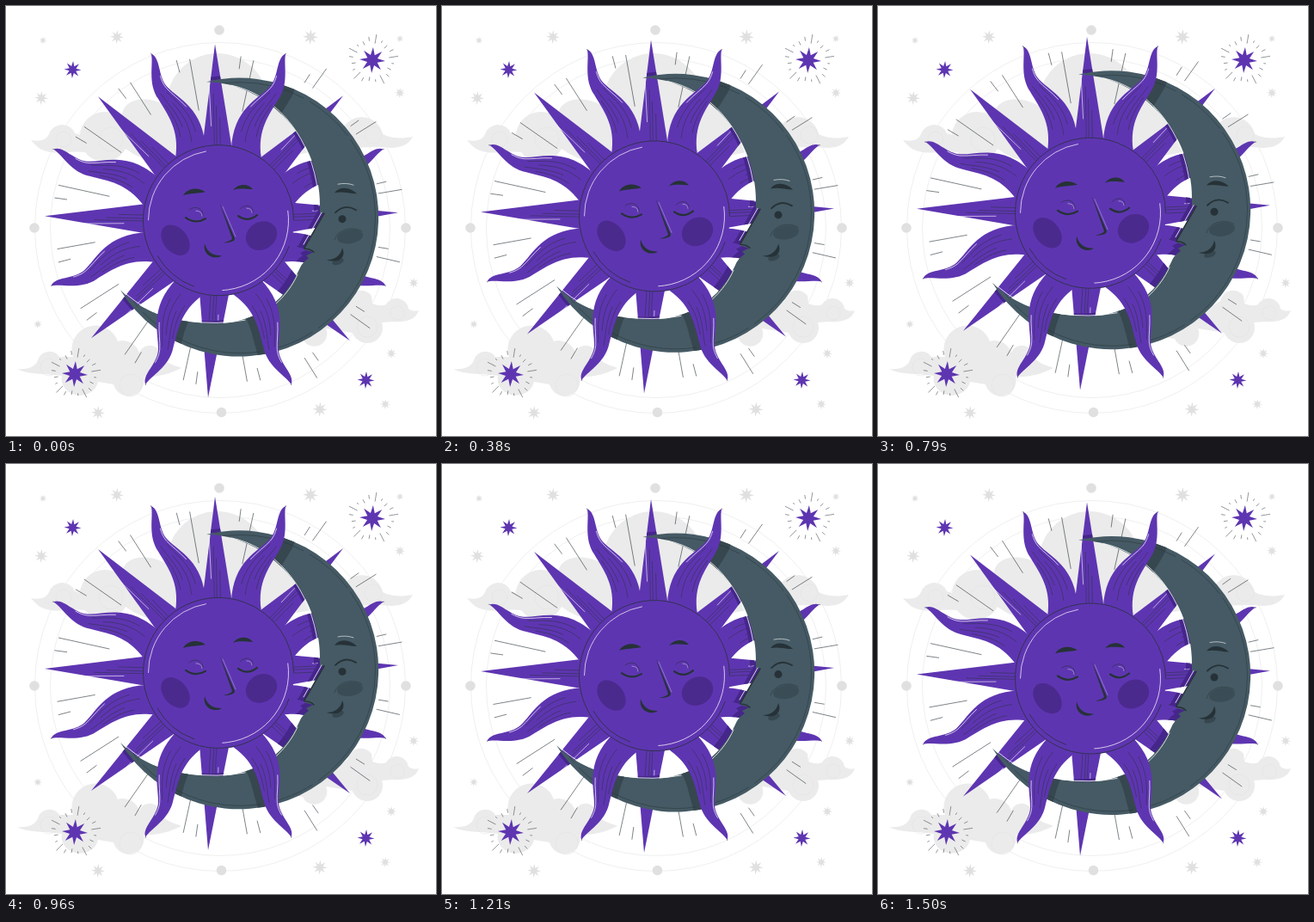
An HTML page that plays this animation: 500x500 px, repeating every 1.54 s.

```html
<!DOCTYPE html>
<html lang="en">
<head>
<meta charset="utf-8">
<title>Sun and moon</title>
<style>
  html, body { margin: 0; width: 100%; height: 100%; overflow: hidden; background: #fff; }
  svg { display: block; width: 100%; height: 100%; }
</style>
</head>
<body>
<svg id="stage" viewBox="0 0 500 500"></svg>
<script>
const PURPLE = '#5e35b1', SLATE = '#455a64', INK = '#263238', GREY = '#e0e0e0', CLOUD = '#ebebeb';
const CX = 247, CY = 249, RAD = Math.PI / 180;

const fill = (d, color, extra = '') => `<path d="${d}" fill="${color}" ${extra}/>`;
const line = (d, color = INK, width = 0.6, extra = '') =>
  `<path d="${d}" fill="none" stroke="${color}" stroke-width="${width}" stroke-linecap="round" ${extra}/>`;
const circle = (x, y, r, attrs) => `<circle cx="${x}" cy="${y}" r="${r}" ${attrs}/>`;
const ring = (x, y, r, color, width, extra = '') =>
  circle(x, y, r, `fill="none" stroke="${color}" stroke-width="${width}" ${extra}`);
const ellipse = (x, y, rx, ry, turn, color) =>
  `<ellipse rx="${rx}" ry="${ry}" fill="${color}" transform="translate(${x} ${y}) rotate(${turn})"/>`;
const repeat = (n, make) => Array.from({ length: n }, (_, i) => make(i));
const mix = (a, b, k) => a.map((p, i) => [p[0] + (b[i][0] - p[0]) * k, p[1] + (b[i][1] - p[1]) * k]);

// Point at distance u along a direction (clockwise from up) and v to its right.
const polar = (angle, u, v = 0, x = CX, y = CY) => {
  const s = Math.sin(angle), c = Math.cos(angle);
  return [x + u * s + v * c, y - u * c + v * s];
};
const segment = (angle, from, to, v = 0, x = CX, y = CY) =>
  `M${polar(angle, from, v, x, y)}L${polar(angle, to, v, x, y)}`;

function star(x, y, r, color) {
  const pts = repeat(16, i => polar(i * Math.PI / 8 + 0.06, i % 2 ? r * 0.42 : r, 0, x, y));
  return `<polygon points="${pts.join(' ')}" fill="${color}"/>`;
}

const burst = (x, y) => line(repeat(20, i =>
  segment(i * Math.PI / 10 + 0.16, 20 + i % 2 * 3, [30, 25, 24, 27][i % 4], 0, x, y)).join(''), INK, 0.5) +
  star(x, y, 15, PURPLE);

// Every flame is the same pair of wavy edges, turned about the sun and mirrored on the right half.
const FLAME_TIP = [209, 0];
const OUTER_EDGE = [[200, 9], [182, -3], [166, 3], [148, 10], [127, 33], [82, 17]];
const INNER_EDGE = [[198, -1], [179, -17], [157, -12], [136, -9], [115, -2], [86, -19]];

function flame(k, side) {
  const angle = side * (22 + 44.7 * k) * RAD;
  const place = ([u, v]) => polar(angle, u, -side * v);
  const tip = place(FLAME_TIP), a = OUTER_EDGE.map(place), b = INNER_EDGE.map(place);
  const edge = share => `M${tip}C${mix(a, b, share)}`;
  const grain = [0.25, 0.45, 0.65, 0.82].map((share, i) =>
    line(edge(share), INK, 0.5, `pathLength="100" stroke-dasharray="0 ${38 + i % 2 * 12} ${44 - i * 4} 100"`)).join('');
  return {
    d: `M${tip}C${a}L${b[5]}C${[...b.slice(0, 5).reverse(), tip]}Z`,
    detail: grain + line(edge(0.1), '#fff', 0.7, 'pathLength="100" stroke-dasharray="0 22 36 100"')
  };
}

function spike([x, y]) {
  const angle = Math.atan2(x - CX, CY - y), reach = Math.hypot(x - CX, y - CY);
  const base = v => polar(angle, 82, v);
  const grain = [-3, 0, 4].map((v, i) => segment(angle, 82, reach - 58 - 14 * i, v)).join('');
  return {
    d: `M${x} ${y}L${base(-17.5)}L${base(17.5)}Z`,
    detail: line(grain, INK, 0.5) + line(segment(angle - 0.03, 110, 155, -3), '#fff', 0.6)
  };
}

const spikeTips = [[243, 44], [392, 104], [456, 240], [400, 389], [235, 455], [99, 386], [45, 244], [107, 105]];
const backRays = [
  ...spikeTips.map(spike),
  ...[0, 1, 2].map(k => flame(k, -1)),
  ...[1, 2].map(k => flame(k, 1))
];
const frontRays = [flame(0, 1), flame(3, -1), flame(3, 1)];
const shadowShift = [13, 8, -9];

// One long radial streak and one short neighbour in each gap between rays.
const streaks = repeat(16, i => {
  const angle = (i + 0.5) * 22.5 * RAD, byMoon = Math.sin(angle) > 0.45;
  return byMoon
    ? segment(angle + 0.03, 189, 216) + segment(angle - 0.03, 189, 200)
    : segment(angle + 0.02, 130 + i % 3 * 8, 190) + segment(angle - 0.06, 178, 192);
}).join('');

const moon = 'M233 88A162 162 0 1 1 133 330C165 362 205 368 245 369C288 368 323 346 341 306' +
  'Q344 298 352 293L349 290L357 286L346 283L370 240L365 241L365 232Q365 216 362 203C350 135 290 88 233 88Z';

const clouds = [
  'M29 156C39 158 47 156 50 149A16 16 0 0 1 80 148L86 150A29 29 0 0 1 135 131C133 108 162 102 187 116' +
  'L188 102A59 59 0 0 1 302 96C330 98 340 120 372 130L390 146A25 25 0 0 1 438 149C450 155 462 154 473 152' +
  'C465 168 445 165 436 164L380 165L250 190Q170 190 139 166A28 28 0 0 1 92 170C75 168 62 172 52 170C38 168 35 162 29 156Z',
  'M13 422C25 423 34 420 37 412A14 14 0 0 1 62 408L78 408A26 26 0 0 1 130 390A20 20 0 0 1 155 403A13 13 0 0 1 180 406' +
  'C185 416 195 417 204 421C190 428 175 432 160 431A18 18 0 1 1 125 440L107 437A20 18 0 0 1 65 430C45 427 25 429 13 422Z',
  'M335 385L398 343A15 15 0 0 1 425 337L426 346Q436 350 442 347A14 14 0 0 1 468 352C472 355 476 355 480 354' +
  'C476 366 462 368 450 367L437 368A18 18 0 1 1 403 380L372 375A13 13 0 0 1 345 387Z'
];
const cloudRings = [[67, 155, 9], [122, 155, 14], [427, 150, 10], [50, 420, 10], [145, 441, 13], [420, 373, 12], [455, 357, 8]];

const greyStars = [[129, 36, 8], [43, 40, 4.5], [41, 107, 8], [354, 36, 9], [458, 38, 4.5], [458, 101, 6],
  [474, 322, 6], [448, 404, 6], [441, 463, 6], [365, 469, 8.5], [107, 473, 8], [37, 370, 5]];

const sunFace =
  fill('M206 220C211 211 224 210 232 216C224 218 214 217 206 220ZM264 214C270 206 282 206 287 213C279 213 272 211 264 214Z', INK) +
  line('M209 246Q220 254 232 247M270 244Q281 252 292 243', INK, 2.2) +
  line('M213 237C220 231 230 235 229 244M272 236C279 229 288 232 287 240', INK, 0.6) +
  line('M221 238Q228 238 228 244M280 235Q286 235 286 240', '#b39ddb', 0.8) +
  ellipse(197, 272, 14, 20, -40, '#4b2a8e') + ellipse(297, 267, 19, 16, -32, '#4b2a8e') +
  fill('M248 228L266 270Q266 275 252 275Q262 273 263 270Z', INK) +
  line('M252 233L267 268', '#b39ddb', 0.6) +
  fill('M231 276C234 286 240 290 251 290C242 296 228 289 231 276Z', INK);

const moonFace =
  fill('M382 217C388 209 400 210 408 218C399 218 391 215 382 217Z', INK) +
  line('M386 207Q396 205 404 208', '#fff', 0.6) +
  line('M383 240Q394 229 407 237', INK, 1.8) + circle(391, 247.5, 4.5, `fill="${INK}"`) +
  ellipse(400, 268, 15, 8, -8, '#3a4c55') + line('M382 272C386 258 405 256 414 262', INK, 0.5) +
  ellipse(386, 297, 7, 3.5, -20, '#37474f') +
  fill('M373 295C381 295 389 291 391 281C396 291 388 300 373 295Z', INK) +
  line('M370 241L347 281', INK, 1.5) + line('M367 240L346 277', '#fff', 0.8) +
  line('M347 282Q354 282 358 286', INK, 1.4);

const paths = rays => rays.map(r => fill(r.d, PURPLE)).join('');
const details = rays => rays.map(r => r.detail).join('');
const sunArc = (r, color, start, sweep) => ring(CX, CY, r, color, 0.7,
  `pathLength="360" stroke-dasharray="${sweep} 360" transform="rotate(${start} ${CX} ${CY})"`);

document.getElementById('stage').innerHTML = `
  <defs>
    <clipPath id="rays">${paths(backRays)}</clipPath>
    <clipPath id="crescent">${fill(moon, SLATE)}</clipPath>
  </defs>
  ${[215.5, 197.5].map(r => ring(249, 258, r, CLOUD, 0.8)).join('')}
  ${clouds.map(d => fill(d, CLOUD)).join('')}
  ${cloudRings.map(c => ring(...c, GREY, 0.5)).join('')}
  ${[[248, 28], [33, 258], [465, 258], [250.5, 472.5]].map(p => circle(...p, 5.8, `fill="${GREY}"`)).join('')}
  ${greyStars.map(s => star(...s, GREY)).join('')}
  ${star(77.5, 74, 10, PURPLE)}${star(418.5, 435, 10, PURPLE)}
  ${burst(426, 63)}${burst(80, 428)}
  <g id="float">
    ${line(streaks)}
    ${paths(backRays)}${details(backRays)}
    <g clip-path="url(#rays)">${fill(moon, '#45268a', 'transform="translate(-7 -3)"')}</g>
    ${fill(moon, SLATE)}
    <g clip-path="url(#crescent)">
      ${frontRays.map((f, i) => fill(f.d, '#37474f', `transform="translate(${shadowShift[i]} 1)"`)).join('')}
      ${ring(272, 246, 157.5, INK, 0.5, 'stroke-dasharray="150 8 60 5"')}
    </g>
    ${line('M262 92C310 102 350 145 361 205L364 232M339 312C327 338 308 352 298 357M278 365Q245 371 212 366M183 360Q160 352 140 335', '#fff', 0.8)}
    ${moonFace}
    ${paths(frontRays)}${details(frontRays)}
    ${circle(CX, CY, 88, `fill="${PURPLE}"`)}
    ${sunArc(87.5, INK, 20, 340)}${sunArc(82, INK, 110, 40)}
    ${sunArc(81.5, '#fff', 180, 80)}${sunArc(81.5, '#fff', -8, 95)}
    ${sunFace}
  </g>`;

const float = document.getElementById('float');

// Linear rise and fall, stepped at 24 pictures per second.
function draw(now) {
  const t = Math.floor((now % 1540) * 0.024 + 0.1) / 0.024;
  const lift = Math.max(0, 9.6 * (1 - Math.abs(t - 725) / 750));
  float.setAttribute('transform', `translate(0 ${0.5 - lift})`);
  requestAnimationFrame(draw);
}
draw(0);
</script>
</body>
</html>
```
